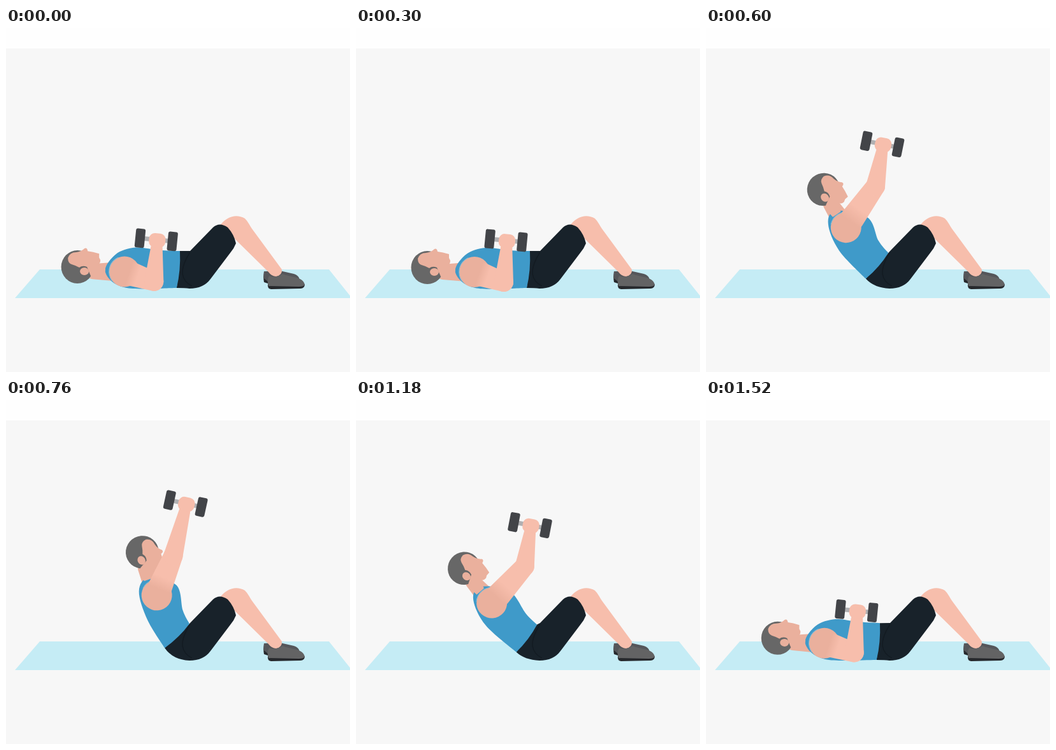
These frames come from a looping animation (540 by 540 pixels, 1.54 s). An HTML page with a canvas:

```html
<!DOCTYPE html>
<html lang="en">
<head>
<meta charset="utf-8">
<title>Dumbbell sit-up</title>
<style>
  html, body { margin: 0; width: 100%; height: 100%; overflow: hidden; background: #f7f7f7; }
  canvas { display: block; width: 100vw; height: 100vh; }
</style>
</head>
<body>
<canvas id="stage" width="540" height="540"></canvas>
<script>
const ctx = document.getElementById('stage').getContext('2d');
const LOOP = 1540, MOVE = 520, RISE = 300, FALL = 1060;
const color = {
  wall: '#f7f7f7', band: '#fefefe', mat: '#c5ecf5', face: '#eab09d', skin: '#f7beac',
  shirt: '#3f9ac9', trim: '#8fbdd3', shorts: '#18222a', seam: '#131b22',
  hair: '#676767', shoe: '#636364', farShoe: '#55565a', sole: '#26282c', plate: '#424448', bar: '#b0b0b2'
};

// Key poses from lying to upright, placed by share of the torso's turn.
const stops = [0, .36, .52, .79, 1];
const poses = [
  { head: [112, 376], shoulder: [186, 383], elbow: [232, 399], weight: [235.5, 333.5], turn: 0, tilt: 5.6,
    shirt: [[273, 350], [240, 349], [203, 345], [172, 356], [156, 384], [187, 408], [268, 408]] },
  { head: [130, 315], shoulder: [192, 347], elbow: [251, 328], weight: [257, 261], turn: 20, tilt: 9,
    shirt: [[276, 352], [246, 338], [212, 318], [179, 322], [163, 347], [190, 379], [259, 404]] },
  { head: [145, 290], shoulder: [203, 332], elbow: [258, 298], weight: [265, 229.5], turn: 29, tilt: 10,
    shirt: [[279, 351], [258, 338], [215, 306], [185, 308], [172, 329], [196, 366], [254, 400]] },
  { head: [182, 255], shoulder: [218.5, 314], elbow: [266, 250], weight: [276, 184.5], turn: 47, tilt: 11.3,
    shirt: [[286, 353], [270, 334], [252, 298], [202, 288], [190.5, 309], [208, 350], [251, 394]] },
  { head: [216, 238], shoulder: [238, 306], elbow: [262, 245], weight: [282, 161.5], turn: 64, tilt: 12.4,
    shirt: [[288, 351], [278, 330], [268, 290], [226, 278], [210, 300], [223, 345], [249, 389]] }
];

const bezier = (a, b, s) => 3 * a * s * (1 - s) ** 2 + 3 * b * s * s * (1 - s) + s ** 3;

// Same curve as cubic-bezier(.2, 0, .4, 1): quick start, long settling.
function ease(u) {
  if (u <= 0 || u >= 1) return u <= 0 ? 0 : 1;
  let low = 0, high = 1;
  for (let i = 0; i < 20; i++) {
    const s = (low + high) / 2;
    if (bezier(.2, .4, s) < u) low = s; else high = s;
  }
  return bezier(0, 1, low);
}

// The fall settles across the loop's seam.
function raised(ms) {
  const sinceFall = (ms - FALL + LOOP) % LOOP;
  return sinceFall < MOVE ? 1 - ease(sinceFall / MOVE) : ms < FALL ? ease((ms - RISE) / MOVE) : 0;
}

const combine = (values, weights) => Array.isArray(values[0])
  ? values[0].map((_, i) => combine(values.map(v => v[i]), weights))
  : values.reduce((sum, v, i) => sum + v * weights[i], 0);
const mix = (a, b, k) => combine([a, b], [1 - k, k]);

// Parabola through three neighbouring key poses.
function arcThrough(first, key, q) {
  const ids = [first, first + 1, first + 2];
  const weights = ids.map(i => ids.reduce((w, j) =>
    j === i ? w : w * (q - stops[j]) / (stops[i] - stops[j]), 1));
  return combine(ids.map(i => poses[i][key]), weights);
}

function poseAt(q) {
  let i = 0;
  while (i < stops.length - 2 && q > stops[i + 1]) i++;
  const k = (q - stops[i]) / (stops[i + 1] - stops[i]);
  const pose = {};
  for (const key in poses[0]) {
    pose[key] = mix(arcThrough(Math.max(i - 1, 0), key, q), arcThrough(Math.min(i, 2), key, q), k);
  }
  return pose;
}

function fill(d, paint) {
  ctx.fillStyle = paint;
  ctx.fill(new Path2D(d));
}

function oval(x, y, rx, ry, paint) {
  ctx.fillStyle = paint;
  ctx.beginPath();
  ctx.ellipse(x, y, rx, ry, 0, 0, 7);
  ctx.fill();
}

function box(x, y, w, h, r, paint) {
  ctx.fillStyle = paint;
  ctx.beginPath();
  ctx.roundRect(x, y, w, h, r);
  ctx.fill();
}

// Limb with a different radius at each end.
function limb(a, ra, b, rb, paint) {
  const dx = b[0] - a[0], dy = b[1] - a[1];
  const dir = Math.atan2(dy, dx), side = Math.acos((ra - rb) / Math.hypot(dx, dy));
  ctx.fillStyle = paint;
  ctx.beginPath();
  ctx.arc(...a, ra, dir + side, dir - side + Math.PI * 2);
  ctx.arc(...b, rb, dir - side, dir + side);
  ctx.fill();
}

function at([x, y], degrees, paint) {
  ctx.save();
  ctx.translate(x, y);
  ctx.rotate(degrees * Math.PI / 180);
  paint();
  ctx.restore();
}

function drawRoom() {
  ctx.fillStyle = color.wall;
  ctx.fillRect(0, 0, 540, 540);
  ctx.fillStyle = color.band;
  ctx.fillRect(0, 0, 540, 32);
  fill('M53 379H507L543 424H14Z', color.mat);
}

function drawLegs() {
  fill('M405 382Q403 392 405 399L460 399Q463 390 452 386L430 381Z', color.farShoe);
  fill('M405 393L412 399L411 401L405 399Z', color.sole);
  fill('M335 311C344 298 360 290 375 299C380 304 382 309 386 315L433 379Q434 388 424 390Q417 390 412 383L354 326Z', color.skin);
  fill('M411 402H469Q469 409 462 409L416 410Q410 409 411 402Z', color.sole);
  fill('M413 389Q423 393 434 386C445 391 467 390 469 403Q467 406 460 406L412 405Q409 397 413 389Z', color.shoe);
}

function drawShorts([x1, y1], [x2, y2]) {
  fill(`M${x1} ${y1}L289 350L325 313Q335 304 348 313Q358 324 361 338Q358 346 352 353L321 394
    Q310 409 288 409Q${x2 + 13} 408 ${x2} ${y2}Z`, color.shorts);
  ctx.strokeStyle = color.seam;
  ctx.lineWidth = 1.5;
  ctx.stroke(new Path2D('M289 352Q276 372 277 386Q279 399 292 405'));
}

// Smooth outline, closed by a slightly bulging waist.
function drawShirt(points) {
  const [top, bottom] = [points[0], points[points.length - 1]];
  ctx.fillStyle = color.shirt;
  ctx.beginPath();
  ctx.moveTo(...top);
  for (let i = 0; i < points.length - 1; i++) {
    const p = points[i], n = points[i + 1];
    const before = points[i - 1] || p, after = points[i + 2] || n;
    ctx.bezierCurveTo(p[0] + (n[0] - before[0]) / 6, p[1] + (n[1] - before[1]) / 6,
      n[0] - (after[0] - p[0]) / 6, n[1] - (after[1] - p[1]) / 6, ...n);
  }
  ctx.quadraticCurveTo((top[0] + bottom[0]) / 2 + 4, (top[1] + bottom[1]) / 2 + 2, ...top);
  ctx.fill();
}

function drawShoulder() {
  oval(0, 0, 24, 24, color.face);
  ctx.strokeStyle = color.trim;
  ctx.lineWidth = 1;
  ctx.beginPath();
  ctx.arc(0, 0, 24.2, 2.5, 4.3);
  ctx.stroke();
}

function drawHead() {
  oval(0, 0, 25.5, 26, color.hair);
  fill(`M-15 -14Q-12 -23 -2 -23Q6 -24 11 -29Q15 -31 16 -25Q24 -24 34 -21L34 -15L36 -11
    Q36 -5 32 -4Q36 0 44 3L42 18Q28 19 21 14L15 0Q8 -3 3 1Q-2 -2 -9 -4Q-15 -6 -15 -14Z`, color.face);
  oval(11, 7, 7, 6, color.face);
}

function drawWeight() {
  box(-24, -3.5, 48, 7, 0, color.bar);
  for (const x of [-25.5, 25.5]) box(x - 7.5, -15, 15, 30, 3, color.plate);
}

function drawArm({ shoulder, elbow, weight, tilt }) {
  const hand = [weight[0] + 1.5, weight[1] + 1];
  const blend = ctx.createLinearGradient(...shoulder, ...elbow);
  blend.addColorStop(.15, color.face);
  blend.addColorStop(.45, color.skin);
  at(weight, tilt, drawWeight);
  limb(mix(shoulder, elbow, .2), 19, elbow, 15, blend);
  limb(elbow, 15, mix(hand, elbow, .15), 9, color.skin);
  at(hand, tilt, () => box(-13, -11, 26, 22, 9, color.skin));
}

function draw(ms) {
  const pose = poseAt(raised(ms));
  const { head, shoulder, turn, shirt } = pose;
  const rad = turn * Math.PI / 180;
  const nape = [head[0] + 25 * Math.cos(rad) - 7 * Math.sin(rad), head[1] + 25 * Math.sin(rad) + 7 * Math.cos(rad)];
  drawRoom();
  drawLegs();
  limb(nape, 12, shoulder, 16, color.face);
  drawShorts(shirt[0], shirt[6]);
  drawShirt(shirt);
  at(shoulder, turn, drawShoulder);
  at(head, turn, drawHead);
  drawArm(pose);
}

function tick() {
  draw(performance.now() % LOOP);
  requestAnimationFrame(tick);
}
tick();
</script>
</body>
</html>
```
